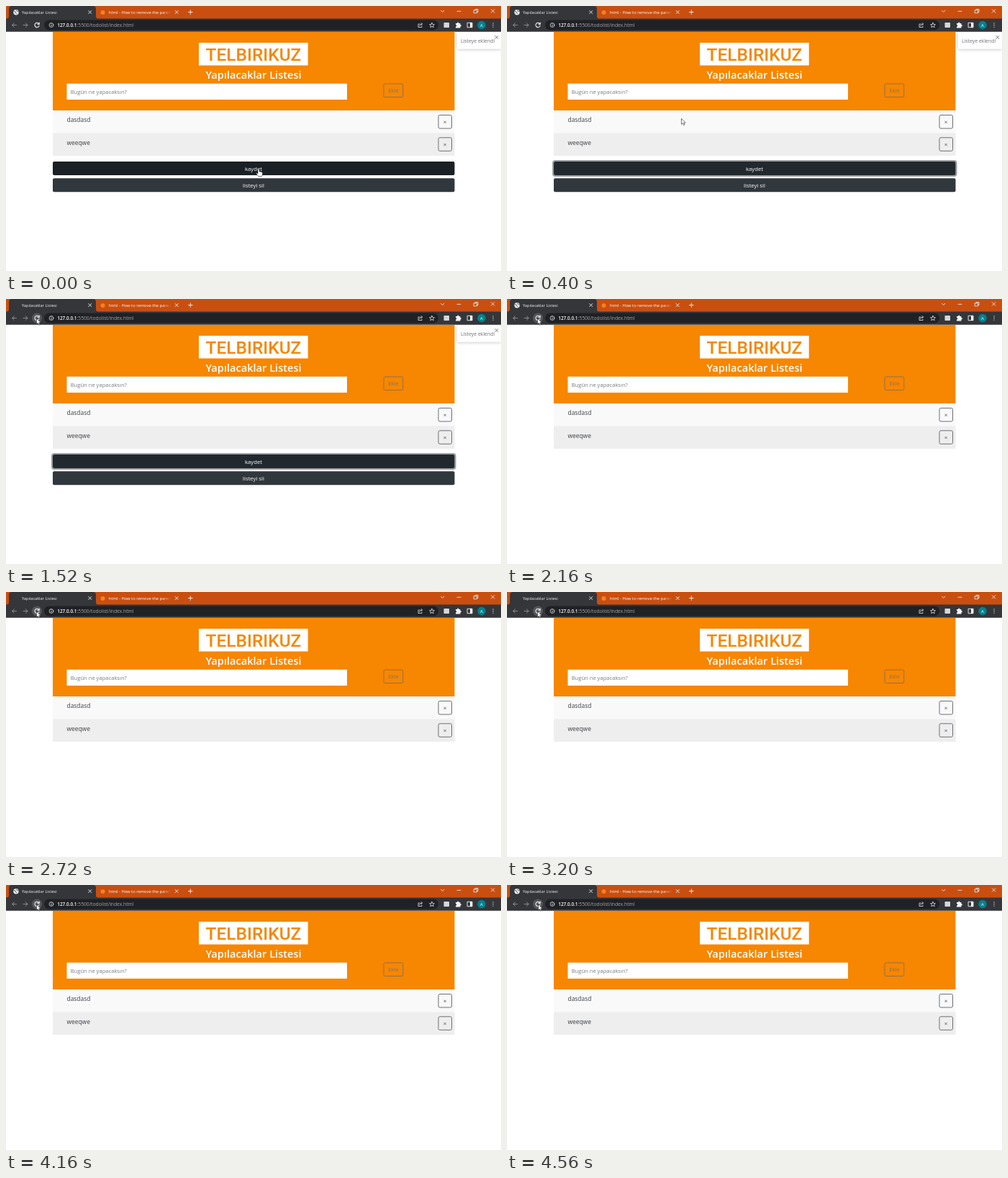
Animation of 688 by 368 pixels, one loop 4.64 s. Source, as an HTML page:

```html
<!DOCTYPE html>
<html lang="tr">
<head>
<meta charset="utf-8">
<title>Yapılacaklar Listesi</title>
<style>
html, body { margin: 0; width: 100%; height: 100%; overflow: hidden; background: #fff; }
svg { display: block; width: 688px; height: 368px; font-family: "Open Sans", "Noto Sans", sans-serif; }
.line { fill: none; stroke: #e3e4e6; stroke-linecap: round; stroke-linejoin: round; }
.mid { text-anchor: middle; }
</style>
</head>
<body>
<svg viewBox="0 0 688 368">
  <defs>
    <linearGradient id="fade">
      <stop offset=".85" stop-color="#fff"/><stop offset="1" stop-color="#fff" stop-opacity="0"/>
    </linearGradient>
    <clipPath id="toastClip"><path d="M627 36h52v24h-52z"/></clipPath>
    <filter id="soft" x="-20%" y="-40%" width="140%" height="200%">
      <feDropShadow dx="0" dy="1" stdDeviation="2" flood-opacity=".22"/>
    </filter>
    <g id="remove">
      <rect x="601" y="151.5" width="18.500" height="18.500" rx="2" fill="none" stroke="#6c7075"/>
      <path d="M608.500 159.700l3.200 3.200m0-3.200l-3.200 3.200" stroke="#555" stroke-width=".8"/>
    </g>
  </defs>

  <!-- tab strip -->
  <path d="M0 0h688v18H0z" fill="#c94f10"/>
  <path d="M0 18Q4 18 4 14V4Q4 0 8 0H121Q125 0 125 4V14Q125 18 129 18z" fill="#35363a"/>
  <g id="globe">
    <circle cx="14" cy="8.700" r="3.700" fill="#f1f3f4"/>
    <path d="M11 7.500q2 0 2.500 1.500t1.500 2.300M14 5.500q0 1.500 1.500 1.500t1.800 1.500" fill="none" stroke="#35363a" stroke-width=".9"/>
  </g>
  <text x="22" y="10.800" font-size="5.620" fill="#f1f3f4">Yapılacaklar Listesi</text>
  <circle cx="134.500" cy="9" r="3" fill="#f48024"/>
  <text x="143" y="10.800" font-size="5.820" fill="url(#fade)">html - How to remove the paren</text>
  <path class="line" d="M114.700 6.500l4 4m0-4l-4 4M235.200 6.500l4 4m0-4l-4 4M253.500 8.500h5.600m-2.800-2.800v5.600"/>
  <path class="line" stroke-width=".9" d="M604.500 6.200l2.200 2.200 2.200-2.200M627 7.300h5M650.500 5.800h4v4h-4zM652 5.800V4.500h4v4h-1.500M674.300 4.600l4.600 4.600m0-4.600l-4.600 4.600"/>

  <!-- toolbar -->
  <path d="M0 17.500h688v18.300H0z" fill="#35363a"/>
  <rect x="53" y="19.500" width="548" height="14" rx="7" fill="#202124"/>
  <path class="line" style="stroke:#8a8c90" d="M14.500 26.500h-6m2.800-2.800l-2.800 2.800 2.800 2.800M24 26.500h6m-2.800-2.800l2.800 2.800-2.800 2.800"/>
  <circle id="hover" cx="43" cy="26.500" r="7" fill="#55565a"/>
  <path class="line" stroke-width="1.200" d="M45.600 24.700A3.100 3.100 0 1 0 46 27.300M46.200 23v2.300h-2.300"/>
  <circle class="line" cx="63" cy="26.500" r="2.900" stroke-width=".8"/>
  <path class="line" stroke-width=".9" d="M63 26.300v1.500m0-3v.1"/>
  <text x="71.300" y="29" font-size="6.400" font-weight="600" fill="#fff">127.0.0.1</text>
  <text x="98.500" y="29" font-size="6.720" fill="#a4a7ab">:5500/todolist/index.html</text>
  <path class="line" stroke-width=".8" d="M575 25h-2v4.500h5V28M574.500 27.500q.3-2.500 4-2.500m-1.400-1.500l1.500 1.500-1.500 1.500"/>
  <path class="line" stroke-width=".8" d="M592 23.300l1 2.200 2.400.2-1.800 1.600.6 2.400-2.200-1.300-2.200 1.300.6-2.400-1.800-1.600 2.400-.2z"/>
  <rect x="608.500" y="23" width="7.500" height="7" rx=".8" fill="#d5d7da"/>
  <path d="M625 24h2q0-1.500 1.200-1.500T629.400 24h2v2q1.400 0 1.400 1.200t-1.400 1.200v2H625v-2q1.300 0 1.300-1.200T625 26z" fill="#f1f3f4"/>
  <path class="line" d="M641.500 23.300h6.500v6.400h-6.500z"/>
  <path d="M645 23h3v7h-3z" fill="#f1f3f4"/>
  <circle cx="661" cy="26.500" r="5.700" fill="#00838f"/>
  <text class="mid" x="661" y="28.700" font-size="6" fill="#fff">A</text>
  <path class="line" stroke-width="1.400" d="M677 23.900v.01m0 2.590v.01m0 2.590v.01"/>

  <!-- page -->
  <path d="M65 36h558.500v109H65z" fill="#f78600"/>
  <path d="M268 51h151.700v31.500H268z" fill="#fff"/>
  <text class="mid" x="344" y="75.800" font-size="24.500" font-weight="500" fill="#f78600" style="font-family:Roboto,sans-serif">TELBIRIKUZ</text>
  <text class="mid" x="344" y="101" font-size="14.600" font-weight="600" fill="#fff">Yapılacaklar Listesi</text>
  <path d="M84.500 107.700H474v22.300H84.500z" fill="#fff"/>
  <text x="89.700" y="121.700" font-size="7.600" fill="#777b80">Bugün ne yapacaksın?</text>
  <rect x="525" y="108" width="26.700" height="18.500" rx="1.500" fill="none" stroke="#927347"/>
  <text class="mid" x="538.500" y="120" font-size="7.700" fill="#8a7657">Ekle</text>
  <path d="M65 145h558.500v31.500H65z" fill="#f9f9fa"/>
  <path d="M65 176.500h558.500V208H65z" fill="#eeeeef"/>
  <g font-size="8.420" fill="#3c3f43">
    <text x="84.500" y="161">dasdasd</text>
    <text x="84.500" y="192.500">weeqwe</text>
  </g>
  <use href="#remove"/>
  <use href="#remove" y="31.300"/>

  <g id="extras">
    <rect id="ring" x="64" y="215" width="560.500" height="21" rx="3" fill="none" stroke="#9b9ea1" stroke-width="2"/>
    <rect id="save" x="65" y="216" width="558.500" height="19" rx="2"/>
    <rect x="65" y="239.300" width="558.500" height="19" rx="2" fill="#30373d"/>
    <g class="mid" font-size="7.700" fill="#fff">
      <text x="344" y="228.500">kaydet</text>
      <text x="344" y="251.500">listeyi sil</text>
    </g>
    <path d="M627 36h61v23.500h-61z" fill="#fff" filter="url(#soft)"/>
    <text x="632" y="50.500" font-size="6.900" fill="#6c7075" clip-path="url(#toastClip)">Listeye eklendi.</text>
    <path d="M679.500 41.200l4.600 4.600m0-4.600l-4.600 4.600" stroke="#555" stroke-width=".8"/>
  </g>

  <g id="cursor" stroke="#222" stroke-width=".6" stroke-linejoin="round" fill="#fff">
    <path id="arrow" d="M0 0v8l1.900-1.700 1.300 2.900 1.400-.6-1.300-2.800h2.500z"/>
    <path id="hand" d="M-1 0Q0-1 1 0V3.500Q2 2.700 2.700 3.800 3.700 3.200 4.200 4.300 5.300 4 5.500 5V7.500Q5.300 9 4.500 10H-.2Q-1.500 8.500-3 6.500-3.500 5.300-2.300 5.300L-1 6.500z"/>
  </g>
</svg>
<script>
const LOOP = 4640, STEP = 80;
const el = id => document.getElementById(id);
const show = (id, on) => el(id).style.display = on ? "" : "none";
const ease = (t, from, to) => {
  const p = Math.min(1, Math.max(0, (t - from) / (to - from)));
  return p * p * (3 - 2 * p);
};
const reloads = [[1440, 1680], [2640, 2880], [3200, 3440]];

function draw(now) {
  const t = Math.floor(now % LOOP / STEP) * STEP;
  const p = ease(t, 80, 880);
  const x = 351 - 308.500 * p + ease(t, 4160, 4480);
  const y = 226.500 - 199.500 * p;
  const onSave = y > 216;

  el("cursor").setAttribute("transform", `translate(${x} ${y})`);
  show("hand", onSave);
  show("arrow", !onSave);
  show("hover", Math.hypot(x - 43, y - 26.500) < 7);
  show("ring", t > 0);
  el("save").setAttribute("fill", onSave ? "#1b2024" : "#22292e");
  show("extras", t < 1680);
  show("globe", !reloads.some(([a, b]) => t >= a && t < b));
  requestAnimationFrame(draw);
}
requestAnimationFrame(draw);
</script>
</body>
</html>
```
